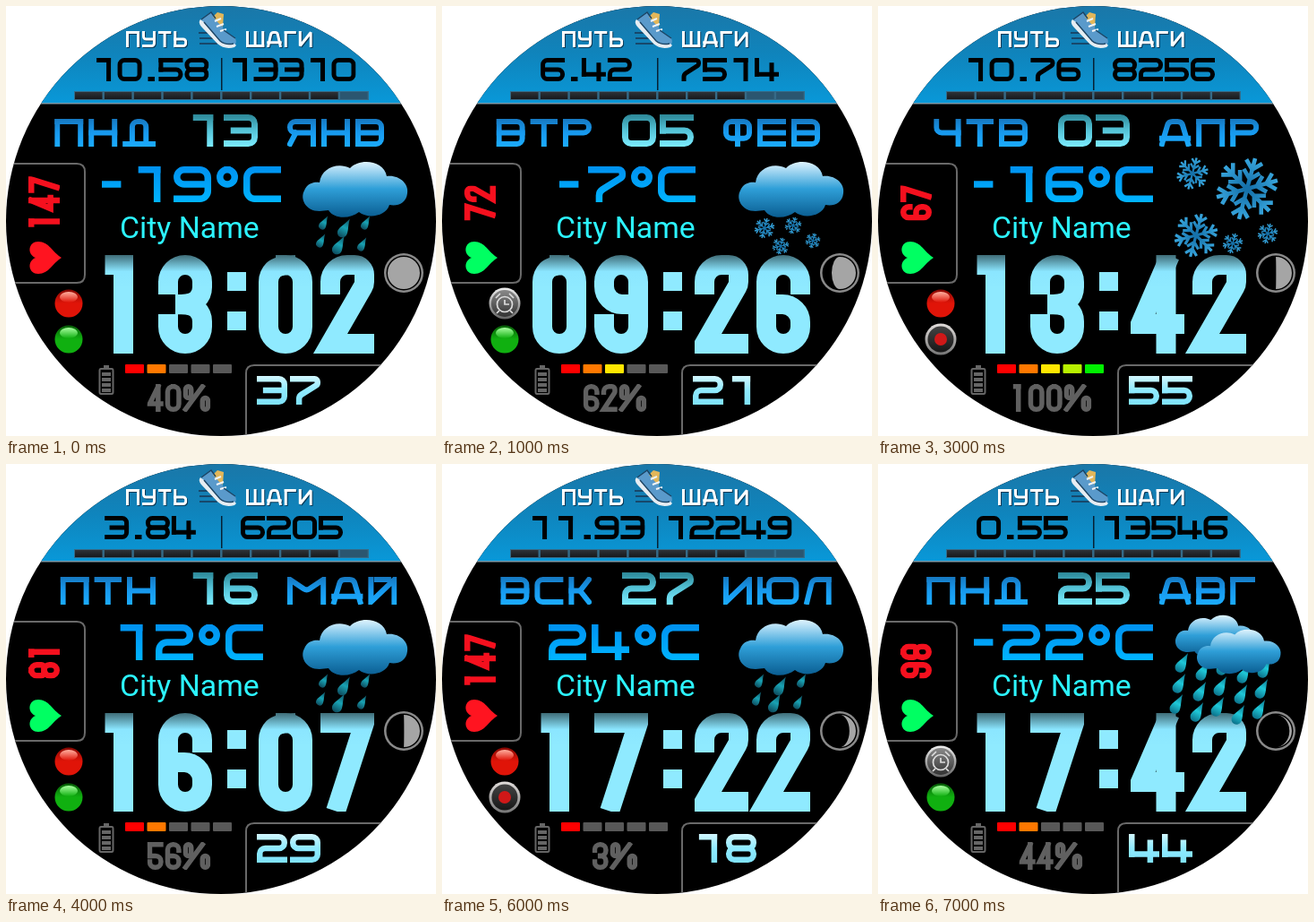
Recreate the animation shown at these times as an HTML page with a canvas. Size 480x480 px, loop 8000 ms.

```html
<!DOCTYPE html>
<html lang="ru">
<meta charset="utf-8">
<title>Watch face</title>
<style>
  html, body { margin: 0; width: 100%; height: 100%; overflow: hidden; background: #fff; }
  canvas { display: block; }
</style>
<canvas id="face" width="480" height="480"></canvas>
<script>
const ctx = document.getElementById('face').getContext('2d');

// Each glyph is a set of strokes through the points a..y of a 5 x 5 grid.
// Corners inside a stroke are rounded unless acute; corners between strokes are square.
const wide = {
  0: 'ceyuac', 1: 'bd dx', 2: 'aeoku uy', 3: 'aeyu lo', 4: 'ap pt ix', 5: 'ea ak koyu',
  6: 'eauyok', 7: 'aejqv', 8: 'ceomkac moyukm', 9: 'okaeyu',
  '.': 'wx', '-': 'kn', '°': 'ceokac', C: 'eauy',
  А: 'ubdy pt', Б: 'eauyok', В: 'aeyu au ko', Г: 'ua ae', Д: 'vbdx uy', Е: 'ea au uy ko',
  И: 'auey', Й: 'auey bd', К: 'au km em my', Л: 'ubd de ey', М: 'uamey', Н: 'au ey ko',
  П: 'ua ae ey', Р: 'au aeok', С: 'eauy', Т: 'ae cw', У: 'ako eyu', Ф: 'cetpac cw',
  Ч: 'ako ey', Ш: 'au uy ye cw', Ь: 'au uyok', Ю: 'au kl ceyvbc', Я: 'ye eako lu'
};
const tall = {
  0: 'ceyuac', 1: 'bc cw', 2: 'faejuy', 3: 'faeom moyup', 4: 'dpt dx',
  5: 'ea ak koyup', 6: 'jeauyok', 7: 'aev', 8: 'ceomkac moyukm', 9: 'okaeyup',
  '%': 'fablkf tyxnot du'
};
const widths = {
  '.': .55, '-': .62, '°': .57, А: 1.1, Б: .95, Г: .87, Д: 1.15, К: .8, Л: .95,
  М: 1.35, Т: .95, Ч: .95, Ш: 1.35, Ю: 1.45, '%': 1.7
};

const styles = {
  label: { font: wide, w: 15, h: 18, line: 3, gap: 3, round: 3 },
  count: { font: wide, w: 27, h: 26, line: 5, gap: 2, round: 5 },
  name: { font: wide, w: 32, h: 31, line: 6, gap: 6, round: 6 },
  day: { font: wide, w: 38, h: 36, line: 7, gap: 4, round: 7 },
  temp: { font: wide, w: 42, h: 40, line: 7.5, gap: 6, round: 9 },
  sec: { font: wide, w: 34, h: 32, line: 6.5, gap: 3, round: 6 },
  time: { font: tall, w: 60, h: 110, line: 22, gap: 9, round: 20 },
  pulse: { font: tall, w: 18.5, h: 35, line: 6.5, gap: 2, round: 6 },
  charge: { font: tall, w: 18, h: 31, line: 5.5, gap: 2, round: 6 }
};

const days = 'ПНД ВТР СРД ЧТВ ПТН СБТ ВСК ПНД'.split(' ');
const months = 'ЯНВ ФЕВ МАР АПР МАЙ ИЮН ИЮЛ АВГ'.split(' ');
// km, steps, lit bars, day, temperature, pulse, time, seconds, charge, alarm, linked, moon edge, weather
const states = [
  ['10.58', '13310', 9, '13', '-19°C', 147, '1302', '37', 40, 0, 1, -1, 'rain'],
  ['6.42', '7514', 8, '05', '-7°C', 72, '0926', '21', 62, 1, 1, -.5, 'snowCloud'],
  ['9.11', '9272', 7, '19', '18°C', 55, '0015', '05', 25, 1, 0, -.06, 'night'],
  ['10.76', '8256', 10, '03', '-16°C', 67, '1342', '55', 100, 0, 0, .02, 'snow'],
  ['3.84', '6205', 9, '16', '12°C', 81, '1607', '29', 56, 0, 1, .02, 'rain'],
  ['1.21', '7898', 10, '28', '9°C', 63, '0113', '55', 78, 1, 1, .6, 'sleet'],
  ['11.93', '12249', 8, '27', '24°C', 147, '1722', '18', 3, 0, 0, .6, 'rain'],
  ['0.55', '13546', 10, '25', '-22°C', 98, '1742', '44', 44, 1, 1, .85, 'storm']
];

function fade(y0, y1, ...colors) {
  const g = ctx.createLinearGradient(0, y0, 0, y1);
  colors.forEach((c, i) => g.addColorStop(i / (colors.length - 1), c));
  return g;
}
function box(x, y, w, h, color, r = 0) {
  ctx.fillStyle = color;
  ctx.beginPath();
  ctx.roundRect(x, y, w, h, r);
  ctx.fill();
}
function disc(x, y, rx, color, ry = rx) {
  ctx.fillStyle = color;
  ctx.beginPath();
  ctx.ellipse(x, y, rx, ry, 0, 0, 7);
  ctx.fill();
}
function shape(d, color) {
  ctx.fillStyle = color;
  ctx.fill(new Path2D(d));
}
function outline(d, color, width) {
  ctx.strokeStyle = color;
  ctx.lineWidth = width;
  ctx.stroke(new Path2D(d));
}
function at(x, y, scale, angle, draw) {
  ctx.save();
  ctx.translate(x, y);
  ctx.rotate(angle);
  ctx.scale(scale, scale);
  draw();
  ctx.restore();
}

function strokeRounded(pts, round) {
  const last = pts.length - 1;
  const step = i => [pts[i + 1][0] - pts[i][0], pts[i + 1][1] - pts[i][1]];
  const room = i => Math.hypot(...step(i)) * (i === 0 || i === last - 1 ? 1 : .5);
  ctx.beginPath();
  ctx.moveTo(...pts[0]);
  for (let i = 1; i < last; i++) {
    const [ax, ay] = step(i - 1), [bx, by] = step(i);
    const acute = ax * bx + ay * by < 0;
    if (acute) ctx.lineTo(...pts[i]);
    else ctx.arcTo(...pts[i], ...pts[i + 1], Math.min(round, room(i - 1), room(i)));
  }
  ctx.lineTo(...pts[last]);
  ctx.stroke();
}
// align: 0 left, .5 centre, 1 right
function write(text, x, y, style, color, align = 0) {
  const { font, w, h, line, gap, round } = style;
  const chars = [...String(text)];
  const widthOf = c => w * (widths[c] || 1);
  const total = chars.reduce((sum, c) => sum + widthOf(c) + gap, -gap);
  x -= align * total;
  ctx.save();
  ctx.beginPath();
  ctx.rect(x, y, total, h);
  ctx.clip();
  ctx.strokeStyle = color;
  ctx.lineWidth = line;
  ctx.lineCap = 'square';
  ctx.miterLimit = 3;
  for (const c of chars) {
    const height = c === '°' ? h * .62 : h;
    const point = p => {
      const i = p.charCodeAt(0) - 97;
      return [x + line / 2 + (widthOf(c) - line) * (i % 5) / 4,
              y + line / 2 + (h - line) * Math.floor(i / 5) / 4];
    };
    for (const s of font[c].split(' ')) strokeRounded([...s].map(point), round);
    x += widthOf(c) + gap;
  }
  ctx.restore();
}

function cloud(x, y, scale, top = '#e4f6ff', mid = '#2f9fd8', low = '#0b5f93') {
  at(x, y, scale, 0, () => {
    shape('M20 56C4 56-2 42 3 33C6 25 14 23 20 24C22 8 40 1 54 8C66-4 92 0 95 17' +
      'C108 15 120 25 118 36C117 47 107 51 98 49C94 62 74 65 64 57C54 65 36 65 30 55Z',
      fade(0, 62, top, mid, low));
  });
}
function drop(x, y, scale = 1, edge = '#0d4a5c', core = '#19a3b4') {
  at(x, y, scale, .5, () => shape('M0-11C2-3 5 1 5 5A5 5 0 0 1-5 5C-5 1-2-3 0-11Z',
    fade(-11, 10, edge, core, edge)));
}
function flake(x, y, r) {
  at(x, y, r / 20, .26, () => {
    const blue = ctx.createRadialGradient(0, 0, 2, 0, 0, 20);
    blue.addColorStop(0, '#1672ab');
    blue.addColorStop(1, '#3aa9e0');
    for (let i = 0; i < 6; i++) {
      outline('M0 0V-19M-5-17L0-12L5-17M-5-11L0-6L5-11', blue, 2.5);
      ctx.rotate(Math.PI / 3);
    }
  });
}
const weather = {
  rain() {
    cloud(330, 173, 1);
    [[355, 242], [378, 248], [402, 242], [352, 262], [372, 267], [398, 266]]
      .forEach(([x, y], i) => drop(x, y, i % 3 === 1 ? 1.1 : .8));
  },
  snowCloud() {
    cloud(330, 173, 1);
    flake(360, 248, 12); flake(392, 245, 10); flake(378, 268, 10); flake(414, 262, 9);
  },
  night() {
    shape('M372 178A42 42 0 1 1 385 262A48 48 0 0 0 372 178Z', fade(176, 262, '#ffd54a', '#f6a916', '#ffe27a'));
    cloud(338, 190, .86, '#38667f', '#154259', '#07202f');
    for (let i = 0; i < 7; i++) drop(356 + i * 11, 252 + i % 2 * 13, .9, '#0a2a3a', '#164a60');
  },
  snow() {
    flake(412, 204, 37); flake(351, 187, 19); flake(355, 256, 26);
    flake(396, 265, 12); flake(435, 254, 12);
  },
  sleet() {
    cloud(330, 173, 1);
    drop(354, 241, .8); drop(376, 250); drop(398, 240, .8); drop(373, 268, .8);
    flake(433, 238, 12); flake(355, 264, 11); flake(396, 257, 9); flake(421, 265, 9); flake(379, 285, 10);
  },
  storm() {
    cloud(331, 168, .75);
    for (let i = 0; i < 15; i++)
      drop(340 + i % 5 * 23 - Math.floor(i / 5) * 3, 222 + Math.floor(i / 5) * 23 + (i * 3 % 5) * 3,
        1.15, '#0b6f88', '#1fc8d8');
    cloud(355, 184, .8);
  }
};

function shoe() {
  outline('M215 30H228M216 36H231M216 42H236', '#17486b', 2);
  shape('M218 15L229 7L234 14L240 17L243 27L256 36Q259 43 252 45L239 41Z', '#5a9acb');
  shape('M231 12L236 7L243 9L242 23L238 20Z', '#e2b75a');
  shape('M217 15Q214 18 218 23L236 42Q244 49 255 46Q259 43 254 42Q245 44 239 39L221 18Z', '#e6edf2');
  outline('M233 17L240 14M235 23L243 20M239 28L246 26', '#eef4f8', 2);
  outline('M218 15L229 7L234 14M243 27L256 36M221 18L239 39Q245 44 254 42', '#1c4565', 1.4);
}
function bezel(x, y) {
  disc(x, y, 17.5, fade(y - 17, y + 17, '#e0dcda', '#777'));
  disc(x, y, 14.5, fade(y - 15, y + 15, '#444', '#161616'));
}
function ball(x, y, light, color, dark) {
  disc(x, y, 15.5, fade(y - 15, y + 15, dark, color, color));
  disc(x, y - 7, 10, fade(y - 13, y - 1, light, color), 6);
}
function alarm(x, y) {
  disc(x, y, 17.5, fade(y - 17, y + 17, '#eee', '#666'));
  disc(x, y, 15, fade(y - 15, y + 15, '#8a8a8a', '#333'));
  ctx.beginPath();
  ctx.arc(x, y + 1, 8.5, 0, 7);
  ctx.strokeStyle = '#ddd';
  ctx.lineWidth = 1.7;
  ctx.stroke();
  outline(`M${x} ${y - 4}v5h5M${x - 10} ${y - 6}l5-5M${x + 10} ${y - 6}l-5-5M${x - 6} ${y + 8}l-3 3M${x + 6} ${y + 8}l3 3`, '#ddd', 1.7);
}
function moon(edge) {
  disc(444, 298, 22, '#8a8a8a');
  disc(444, 298, 19.5, '#000');
  ctx.fillStyle = '#a5a5a5';
  ctx.beginPath();
  ctx.arc(444, 298, 18, -Math.PI / 2, Math.PI / 2);
  ctx.ellipse(444, 298, 18 * Math.abs(edge), 18, 0, Math.PI / 2, -Math.PI / 2, edge > 0);
  ctx.fill();
}

function topPanel(km, steps, lit) {
  box(0, 0, 480, 108, fade(0, 108, '#1a77a8', '#0f84bc', '#0998d8'));
  box(0, 108, 480, 1.5, '#7a99a8');
  for (const [dx, color] of [[1, '#0a3a58'], [0, '#fff']]) {
    write('ПУТЬ', 134 + dx, 28 + dx, styles.label, color);
    write('ШАГИ', 268 + dx, 28 + dx, styles.label, color);
  }
  shoe();
  box(240, 58, 1.5, 36, '#062033');
  write(km, 161, 58, styles.count, '#000', .5);
  write(steps, 319, 58, styles.count, '#000', .5);
  box(76, 95, 329, 10, '#356b88');
  for (let i = 0; i < 10; i++)
    box(77 + i * 32.9, 96, 30.5, 8, i < lit ? fade(96, 104, '#2e3338', '#17191c') : '#2b5670');
}
function leftPanel(pulse, isAlarm, isLinked) {
  outline('M-2 176H79Q88 176 88 185V300Q88 309 79 309H-2', '#696969', 2);
  at(25, 220, 1, -Math.PI / 2, () => write(pulse, 0, 0, styles.pulse, '#f5101e', .5));
  at(43, 281, 1, -Math.PI / 2, () =>
    shape('M0 19C-6 9-18 5-18-7C-18-18-4-20 0-10C4-20 18-18 18-7C18 5 6 9 0 19Z',
      pulse > 100 ? '#ff1420' : '#00ff62'));
  if (isAlarm) alarm(70, 332);
  else ball(70, 332, '#ffb0a0', '#e01408', '#8c0a04');
  if (isLinked) ball(70, 372, '#a8ffa0', '#10b010', '#086008');
  else {
    bezel(70, 372);
    disc(70, 372, 7, '#d01818');
  }
}
function battery(charge) {
  outline('M106 405H118Q119.500 405 119.500 407V431Q119.500 433 118 433H106Q104.500 433 104.500 431V407Q104.500 405 106 405Z', '#666', 2);
  box(109, 401, 6, 3, '#666');
  for (let y = 409; y < 431; y += 6) box(107, y, 10, 4, '#666');
  const lit = Math.max(1, Math.floor(charge / 20));
  ['#f00', '#ff7800', '#ffe600', '#b8f000', '#00f000']
    .forEach((c, i) => box(133 + i * 24.5, 400, 21, 10, i < lit ? c : '#585858', 1));
  write(charge + '%', 193, 422, styles.charge, '#606060', .5);
}

function draw(index) {
  const [km, steps, lit, day, temp, pulse, time, sec, charge, isAlarm, isLinked, edge, sky] = states[index];
  ctx.fillStyle = '#fff';
  ctx.fillRect(0, 0, 480, 480);
  ctx.save();
  ctx.beginPath();
  ctx.arc(240, 240, 240, 0, 7);
  ctx.clip();
  box(0, 0, 480, 480, '#000');
  topPanel(km, steps, lit);

  const blue = fade(124, 158, '#1674bb', '#1799ee', '#1cadff');
  write(days[index], 167, 126, styles.name, blue, 1);
  write(months[index], 314, 126, styles.name, blue);
  write(day, 201, 121, styles.day, fade(121, 157, '#2c8797', '#55c4d8', '#7cecff'));
  write(temp, temp[0] === '-' ? 207 : 203, 179, styles.temp, fade(179, 219, '#0091f0', '#00b4ff'), .5);
  ctx.fillStyle = '#2cf4ff';
  ctx.font = '33.8px Roboto, sans-serif';
  ctx.fillText('City Name', 127, 258.500);

  leftPanel(pulse, isAlarm, isLinked);
  const ice = fade(278, 388, '#3f6d78', '#8be6ff', '#8feaff', '#8feaff', '#8feaff', '#8feaff', '#8feaff');
  write(time.slice(0, 2), 101, 278, styles.time, ice);
  write(time.slice(2), 411, 278, styles.time, ice, 1);
  box(247, 297, 21, 21, '#8feaff');
  box(247, 341, 21, 21, '#8feaff');
  weather[sky]();
  moon(edge);

  battery(charge);
  outline('M482 401H277Q268 401 268 410V482', '#696969', 2);
  write(sec, 280, 413, styles.sec, fade(413, 445, '#d2f7ff', '#8feaff', '#7fe2fa'));
  ctx.restore();
}

function tick() {
  draw(Math.floor(performance.now() / 1000) % states.length);
  requestAnimationFrame(tick);
}
tick();
</script>
</html>
```
